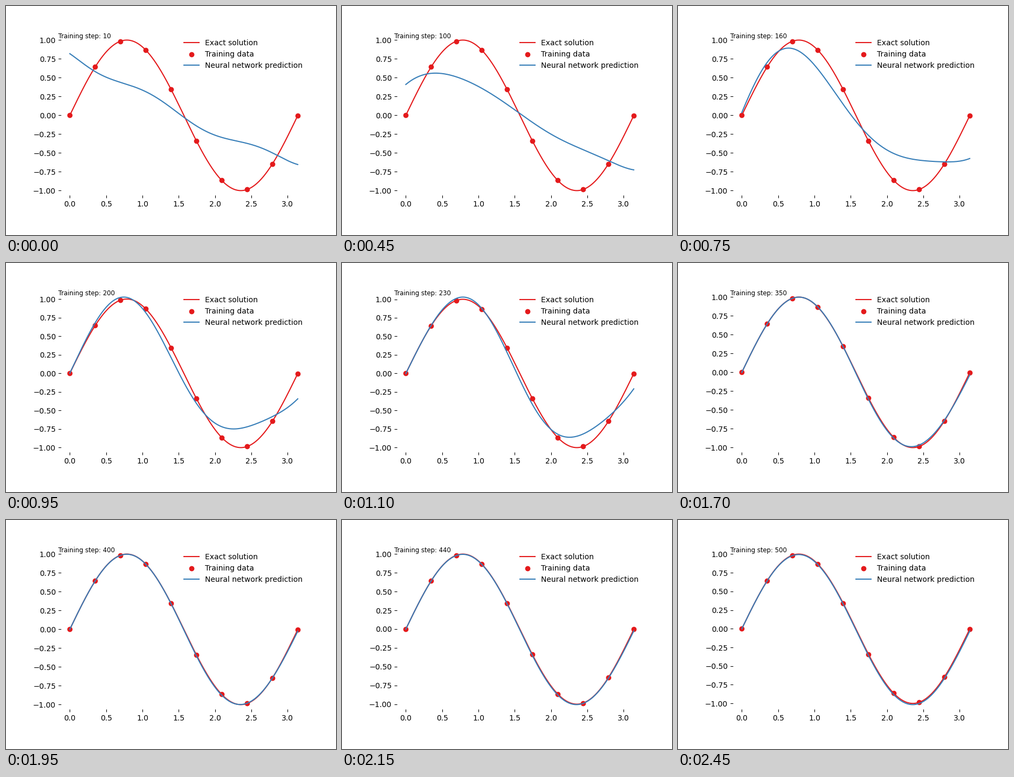
A matplotlib script that plays this animation: 612x426 px, repeating every 2.5 s.

```python
import numpy as np
import matplotlib.pyplot as plt
from matplotlib.animation import FuncAnimation

W, H, DPI = 612, 426, 100
FRAMES, INTERVAL = 50, 50
RED, BLUE = "#e41a1c", "#377eb8"
LEFT, BOTTOM, AX_W, AX_H = 97.2, 68.6, 465, 308
X_END = 3.14

plt.rcParams["font.family"] = "DejaVu Sans"

x = np.linspace(0, X_END, 315)
x_data = np.linspace(0, X_END, 10)
exact = np.sin(2 * x)

# The error is a wave along the distance from the right end. Its height is
# set at four places, each with a start height, half-life and sharpness.
PLACES = [0, 0.95, 2.15, X_END]
HEIGHTS = [(1.02, 188, 5.5), (0.63, 180, 5), (0.58, 152, 6), (1.15, 102, 7.5)]


def fade(step, half, power):
    """Fall from 1 to 0, passing one half at the given step."""
    return 1 / (1 + (step / half)**power)


def predict(step):
    u = X_END - x
    heights = [a * fade(step, half, power) for a, half, power in HEIGHTS]
    envelope = np.polyval(np.polyfit(PLACES, heights, 3), u)
    half_wave = 0.74 + 0.53 * fade(step, 195, 6)
    phase = 0.3 - 0.08 * fade(step, 100, 4)
    error = envelope * np.sin(np.pi * (u / half_wave - phase))
    drift = -0.008 * x * (step / 500)**4
    return exact + error + drift


fig = plt.figure(figsize=(W / DPI, H / DPI), dpi=DPI, facecolor="white")
ax = fig.add_axes([LEFT / W, BOTTOM / H, AX_W / W, AX_H / H])
ax.set_frame_on(False)
ax.tick_params(direction="in")

ax.plot(x, exact, color=RED, label="Exact solution")
ax.scatter(x_data, np.sin(2 * x_data), color=RED, label="Training data")
prediction, = ax.plot(x, exact, color=BLUE, label="Neural network prediction")
ax.legend(loc="upper right", frameon=False)
caption = fig.text(LEFT / W, 366 / H, "", fontsize="small")

ax.set_xticks(np.arange(0, 3.1, 0.5))
ax.set_yticks(np.arange(-1, 1.1, 0.25))
ax.set_xlim(-0.05 * X_END, 1.05 * X_END)


def update(frame):
    step = 10 * (frame + 1)
    y = predict(step)
    prediction.set_ydata(y)
    caption.set_text(f"Training step: {step}")
    low, high = min(y.min(), exact.min()), max(y.max(), exact.max())
    margin = 0.05 * (high - low)
    ax.set_ylim(low - margin, high + margin)
    return prediction, caption


anim = FuncAnimation(fig, update, frames=FRAMES, interval=INTERVAL,
                     repeat=True, repeat_delay=0, blit=False)
plt.show()
```
